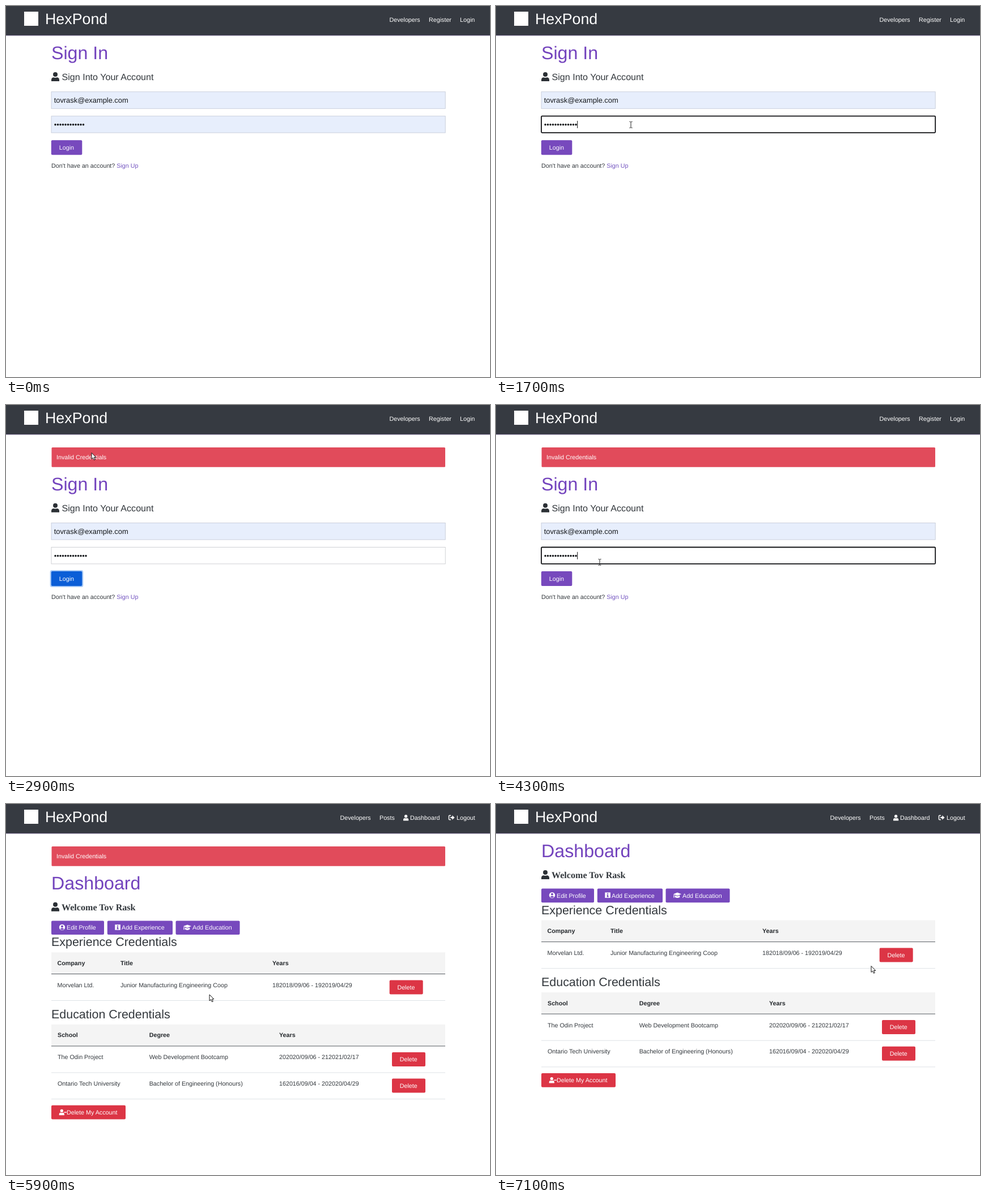
Animation, 854 px wide and 656 px high, one loop 7.2 s. Source, as an HTML page:

```html
<!DOCTYPE html>
<html lang="en">
<head>
<meta charset="utf-8">
<title>Sign in</title>
<style>
  html, body { margin: 0; width: 100%; height: 100%; overflow: hidden; background: #fff; }
  svg { display: block; width: 854px; height: 656px; }
  text {
    font: 10.72px "Liberation Sans", Arial, sans-serif;
    text-rendering: geometricPrecision;
    fill: #33383d;
    white-space: pre;
  }
  .brand { font-size: 26.8px; }
  .h1 { font-size: 32.2px; fill: #7343bd; }
  .h2 { font-size: 21.44px; }
  .lead { font-size: 16.1px; }
  .welcome { font: bold 16.1px "Liberation Serif", Times, serif; }
  .input { font-size: 12.86px; fill: #15181b; }
  .th { font-weight: bold; fill: #24282c; }
  .link { fill: #7354c0; }
  .white, .brand { fill: #fff; }
  .menu { font: 8.2px "Open Sans", "Noto Sans", sans-serif; fill: #f1f1f3; }
</style>
</head>
<body>
<svg id="stage" viewBox="0 0 854 656" xmlns="http://www.w3.org/2000/svg">
  <defs>
    <g id="user">
      <circle cx="7" cy="4" r="4"/>
      <path d="M0 16v-2.2Q0 9.3 4.3 9.2Q7 10.4 9.7 9.2Q14 9.3 14 13.8V16z"/>
    </g>
  </defs>

  <rect width="854" height="52.4" fill="#5b4c78"/>
  <rect width="854" height="51.6" fill="#363a41"/>
  <rect x="32" y="10" width="25" height="25" fill="#fff"/>
  <text class="brand" x="69" y="32">HexPond</text>
  <g id="guestNav"></g>
  <g id="memberNav">
    <use href="#user" fill="#fff" transform="translate(701 19) scale(.66)"/>
    <path d="M785 20.3h-2.6q-.9 0-.9.9v5.6q0 .9.9.9h2.6" fill="none" stroke="#fff" stroke-width="1.5"/>
    <path d="M784.3 22.7h3V20l4.3 4-4.3 4v-2.7h-3z" fill="#fff"/>
  </g>

  <g id="alert">
    <rect x="80.5" y="75" width="694.5" height="34.7" rx="1.5" fill="#e14b5b"/>
    <text class="white" x="89" y="96">Invalid Credentials</text>
  </g>

  <g id="signIn">
    <text class="h1" x="80" y="94">Sign In</text>
    <use href="#user" fill="#2b3035" transform="translate(80 117)"/>
    <text class="lead" x="98.5" y="131">Sign Into Your Account</text>
    <rect x="80" y="151.7" width="695.2" height="29.6" fill="#e7eefc" stroke="#c6ccd9" stroke-width=".9"/>
    <text class="input" x="84.7" y="171">tovrask@example.com</text>
    <rect id="password" x="80" y="194.7" width="695.2" height="29.4"/>
    <text class="input" id="dots" x="84.7" y="214"></text>
    <rect id="caret" y="203" width="1" height="13" fill="#111"/>
    <rect id="ring" x="77.7" y="235.2" width="58.6" height="30" rx="3.5" fill="#a9caf6"/>
    <rect id="login" x="79.8" y="237.2" width="54.5" height="26" rx="2"/>
    <text class="white" x="93.8" y="254.2">Login</text>
    <text x="80" y="286">Don't have an account? <tspan class="link">Sign Up</tspan></text>
  </g>

  <g id="menu">
    <rect x="79.5" y="226" width="138" height="78" rx="3" fill="#000" opacity=".15"/>
    <rect x="80" y="225.3" width="137" height="77" rx="2" fill="#27282d"/>
    <rect x="80" y="274.6" width="137" height="1" fill="#43444a"/>
    <rect x="88" y="245.5" width="11" height="10" fill="#a23fc4"/>
    <text class="menu" x="107" y="246">tovrask@example.com</text>
    <path d="M108 258h41" stroke="#f1f1f3" stroke-width="2" stroke-linecap="round" stroke-dasharray="0 3.65"/>
    <circle cx="93.3" cy="289" r="2.5" fill="none" stroke="#b9bac0" stroke-width="1.8"/>
    <circle cx="93.3" cy="289" r="3.8" fill="none" stroke="#b9bac0" stroke-width="1.3" stroke-dasharray="1.5 1.48"/>
    <text class="menu" x="107" y="292">Manage passwords...</text>
  </g>

  <g id="dashboard">
    <text class="h1" x="80" y="94">Dashboard</text>
    <use href="#user" fill="#2b3035" transform="translate(80 117)"/>
    <text class="welcome" x="98" y="131">Welcome Tov Rask</text>
  </g>

  <g id="cursor" stroke-linejoin="round">
    <path id="arrow" d="M0 0V11L2.5 8.7L4.4 12.8L6.3 12L4.5 8H7.8z" fill="#fff" stroke="#111"/>
    <path id="beam" d="M-2.5-5.5Q0-5.5 0-4.5Q0-5.5 2.5-5.5M0-4.5V4.5M-2.5 5.5Q0 5.5 0 4.5Q0 5.5 2.5 5.5" fill="none" stroke="#222"/>
    <path id="hand" d="M0 8V1Q1.2-1 2.4 1V5Q3.7 4 4.6 5.3Q5.8 4.5 6.6 5.8Q8 5.3 8.3 7V10.5L7 14.5H1.6L-2.4 9.2Q-2.4 7.2 0 8z" fill="#fff" stroke="#111"/>
  </g>
</svg>

<script>
const $ = id => document.getElementById(id);
const LOOP = 7200, STEP = 100, SHIFT = 56.8;

function add(parent, tag, attrs, content = "") {
  const el = document.createElementNS("http://www.w3.org/2000/svg", tag);
  for (const k in attrs) el.setAttribute(k, attrs[k]);
  el.textContent = content;
  return parent.appendChild(el);
}
const label = (parent, x, y, content, cls = "") => add(parent, "text", { x, y, class: cls }, content);

function button(x, y, w, h, fill, textX, content) {
  const rect = add($("dashboard"), "rect", { x, y, width: w, height: h, rx: 2, fill });
  label($("dashboard"), textX, y + h / 2 + 3.7, content, "white");
  return rect;
}
const icon = (d, fill = "#fff") => add($("dashboard"), "path", { d, fill });

function table(top, title, columns, head, rows, deleteX) {
  const g = $("dashboard");
  label(g, 80, top - 11, title, "h2");
  add(g, "rect", { x: 80, y: top, width: 695, height: 38, fill: "#f4f4f4" });
  add(g, "rect", { x: 80, y: top + 37.7, width: 695, height: 1, fill: "#555a60" });
  head.forEach((s, i) => label(g, columns[i], top + 22.5, s, "th"));
  return rows.map((row, r) => {
    const y = top + 61.7 + r * 46.7;
    row.forEach((s, i) => label(g, columns[i], y, s));
    add(g, "rect", { x: 80, y: y + 23, width: 695, height: 1, fill: "#dee2e6" });
    return button(deleteX, y - 12.6, 59, 25, "#dc3545", deleteX + 13.7, "Delete");
  });
}

for (const [x, s] of [[676.5, "Developers"], [746, "Register"], [801, "Login"]])
  label($("guestNav"), x, 28, s, "white");
for (const [x, s] of [[589.5, "Developers"], [659, "Posts"], [713, "Dashboard"], [795, "Logout"]])
  label($("memberNav"), x, 28, s, "white");

const PURPLE = "#7749bd";
button(80, 149.6, 93, 24.6, PURPLE, 107, "Edit Profile");
button(178.8, 149.6, 115.2, 24.6, PURPLE, 204, "Add Experience");
button(299.5, 149.6, 113, 24.6, PURPLE, 329, "Add Education");
add($("dashboard"), "circle", { cx: 99, cy: 161.2, r: 5.2, fill: "#fff" });
icon("M99 157.6a2 2 0 0 1 0 4a2 2 0 0 1 0-4M95.6 164.5Q99 160.6 102.4 164.5Q99 167.2 95.6 164.5", PURPLE);
icon("M192.3 156.4h9.6v9.6h-9.6z");
icon("M196.1 157.8h2v1.8h-2zM195.5 160.5h2.6v3h.7v1.2h-3.4v-1.2h.7v-1.8h-.6z", PURPLE);
icon("M313 159.3L320 156.6L327 159.3L320 162.2zM315.8 161.6L320 163.3L324.2 161.6V165Q320 167.2 315.8 165zM313.6 160h1v5.5h-1.4z");

table(205.5, "Experience Credentials", [90.5, 202, 470], ["Company", "Title", "Years"],
  [["Morvelan Ltd.", "Junior Manufacturing Engineering Coop", "182018/09/06 - 192019/04/29"]], 676.7);
const [, lastDelete] = table(333, "Education Credentials", [91, 252.7, 482], ["School", "Degree", "Years"], [
  ["The Odin Project", "Web Development Bootcamp", "202020/09/06 - 212021/02/17"],
  ["Ontario Tech University", "Bachelor of Engineering (Honours)", "162016/09/04 - 202020/04/29"]
], 681);
button(80, 476, 131, 24.8, "#dc3545", 107, "Delete My Account");
add($("dashboard"), "use", { href: "#user", fill: "#fff", transform: "translate(93.7 483) scale(.66)" });
icon("M102.3 487.6h4.7v1.4h-4.7z");

// time, x, y, pointer shape
const PATH = [
  [100, 430, 600, "arrow"], [500, 330, 330, "arrow"], [700, 250, 215, "beam"], [900, 238, 210, "beam"],
  [1800, 238, 210, "beam"], [2100, 170, 235, "arrow"], [2300, 122, 243, "hand"], [2600, 122, 243, "arrow"],
  [2800, 140, 130, "arrow"], [2900, 151, 84.5, "arrow"], [3300, 151, 88, "arrow"], [3700, 178, 255, "beam"],
  [3900, 183, 278, "beam"], [4600, 183, 278, "beam"], [4700, 150, 305, "arrow"], [4800, 150, 305, "arrow"],
  [4900, 121, 301, "hand"], [5500, 121, 301, "hand"], [5600, 150, 315, "arrow"], [5900, 359, 337, "arrow"],
  [6100, 400, 350, "arrow"], [6300, 400, 350, "arrow"], [6700, 690, 420, "arrow"], [6800, 706, 437, "hand"],
  [6900, 706, 437, "hand"], [7000, 700, 400, "arrow"], [7100, 662, 286.5, "arrow"], [7200, 662, 286.5, "arrow"]
];
const LOGIN_FILL = [
  [0, PURPLE], [2300, "#6656c6"], [2400, "#3a7ada"], [2500, "#0b5ed7"], [3900, PURPLE],
  [4900, "#3a64cc"], [5000, "#0b5ed7"]
];

const within = (t, a, b) => t >= a && t < b;
const show = (id, on) => $(id).setAttribute("visibility", on ? "visible" : "hidden");
const set = (id, attrs) => { for (const k in attrs) $(id).setAttribute(k, attrs[k]); };

function moveCursor(t) {
  show("cursor", t >= PATH[0][0]);
  const i = Math.max(0, PATH.findLastIndex(p => p[0] <= t));
  const a = PATH[i], b = PATH[i + 1] || a;
  const k = Math.max(0, (t - a[0]) / (b[0] - a[0] || 1));
  set("cursor", { transform: `translate(${a[1] + (b[1] - a[1]) * k} ${a[2] + (b[2] - a[2]) * k})` });
  for (const s of ["arrow", "beam", "hand"]) $(s).style.display = s === a[3] ? "" : "none";
}

function render(t) {
  const member = t >= 5700, alert = within(t, 2700, 6500);
  const focused = within(t, 1000, 2300) || within(t, 3900, 5000);
  const count = within(t, 1700, 4500) ? 13 : 12;

  show("guestNav", !member);
  show("memberNav", member);
  show("signIn", !member);
  show("dashboard", member);
  show("alert", alert);
  show("menu", within(t, 1000, 1700));
  const shift = `translate(0 ${alert ? SHIFT : 0})`;
  set("signIn", { transform: shift });
  set("dashboard", { transform: shift });

  set("password", {
    fill: t < 1700 ? "#e7eefc" : "#fff",
    stroke: focused ? "#101114" : t < 1700 ? "#c6ccd9" : "#cbccd0",
    "stroke-width": focused ? 1.8 : 0.9,
    rx: focused ? 1.5 : 0
  });
  $("dots").textContent = "•".repeat(count);
  set("caret", { x: 84.7 + count * 4.5 });
  show("caret", focused && !member);
  show("ring", !member && (within(t, 2400, 3900) || t >= 5000));
  set("login", { fill: LOGIN_FILL.findLast(s => s[0] <= t)[1] });
  lastDelete.setAttribute("fill", within(t, 6800, 7000) ? "#bb2d3b" : "#dc3545");
  moveCursor(t);
}

const start = performance.now();
function tick(now) {
  const t = Math.max(0, now - start) % LOOP;
  render(Math.floor(t / STEP) * STEP);
  requestAnimationFrame(tick);
}
render(0);
requestAnimationFrame(tick);
</script>
</body>
</html>
```
